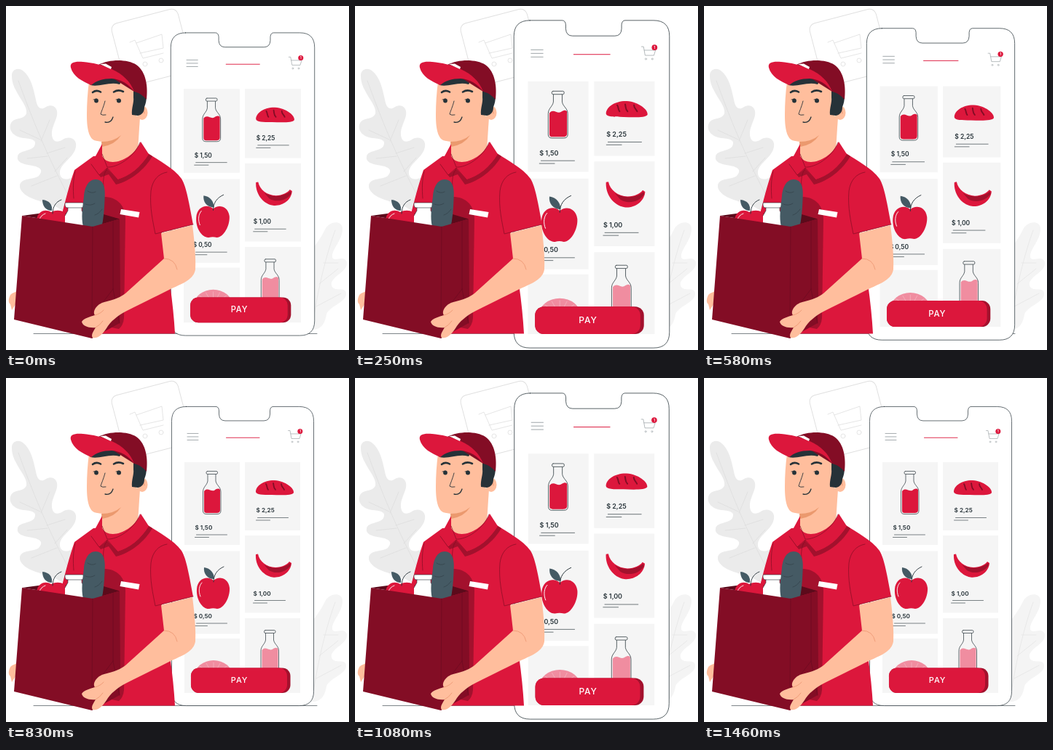
Animation, 471 px wide and 474 px high, one loop 1.5 s. Source, as an HTML page with a canvas:

```html
<!DOCTYPE html>
<html lang="en">
<head>
<meta charset="utf-8">
<title>Grocery delivery</title>
<style>
  html, body { margin: 0; width: 100%; height: 100%; overflow: hidden; background: #fff; }
  canvas { display: block; width: 471px; height: 474px; }
</style>
</head>
<body>
<canvas id="stage"></canvas>
<script>
const W = 471, H = 474, LOOP = 1500;
const RED = '#dc173c', SHADE = '#a3112d', WINE = '#830d25', PINK = '#f08da0';
const INK = '#263238', SLATE = '#455a64', FAINT = '#8f979b', SKIN = '#ffbe9d', PALE = '#ebebeb', TILE = '#f5f5f5';

const canvas = document.getElementById('stage');
const ctx = canvas.getContext('2d');
const ratio = window.devicePixelRatio || 1;
canvas.width = W * ratio;
canvas.height = H * ratio;

function fill(d, color) {
  ctx.fillStyle = color;
  ctx.fill(new Path2D(d));
}

function line(d, color = INK, width = 0.7) {
  ctx.strokeStyle = color;
  ctx.lineWidth = width;
  ctx.stroke(new Path2D(d));
}

function dot(x, y, rx, color, ry = rx) {
  ctx.fillStyle = color;
  ctx.beginPath();
  ctx.ellipse(x, y, rx, ry, 0, 0, Math.PI * 2);
  ctx.fill();
}

function box(x, y, w, h, color, r = 0) {
  ctx.fillStyle = color;
  ctx.beginPath();
  ctx.roundRect(x, y, w, h, r);
  ctx.fill();
}

function text(str, x, y, font, color, align = 'left', spacing = 0) {
  ctx.font = font + ' Inter, "Open Sans", sans-serif';
  ctx.letterSpacing = spacing + 'px';
  ctx.fillStyle = color;
  ctx.textAlign = align;
  ctx.fillText(str, x, y);
}

function at(x, y, draw) {
  ctx.save();
  ctx.translate(x, y);
  draw();
  ctx.restore();
}

function background() {
  fill('M8 97C7 88 16 84 23 89C35 98 38 116 41 129C43 141 48 144 55 139C64 134 72 140 70 151C68 160 62 168 63 178C64 187 70 189 78 184C88 178 98 184 96 194C94 208 76 216 74 228C73 237 80 241 89 237C102 231 115 231 121 241L124 280L80 284C68 274 55 272 44 268C30 264 18 256 19 247C21 236 38 240 45 234C52 226 47 222 36 220C25 218 14 216 16 207C18 198 34 201 39 193C43 185 36 183 25 182C11 181 2 171 7 161C12 153 25 157 28 148C30 139 19 128 14 117C10 110 8 104 8 97Z', PALE);
  line('M17 103C34 150 58 212 91 271M48 186L60 157M56 203L81 195M67 228L84 209M47 184L19 171M57 207L29 210M70 234L35 248', '#dedede', 0.8);

  fill('M410 350C421 333 430 325 438 308C444 296 461 295 462 306C463 322 447 335 448 346C450 354 464 342 468 353C470 367 445 372 447 385C450 395 465 386 467 395C469 408 444 413 440 425C438 437 433 445 423 446L405 445Z', '#f4f4f4');
  line('M452 309C440 342 428 390 421 440M436 354L456 354M430 383L456 362M426 414L460 396', '#e3e3e3', 0.7);

  ctx.save();
  ctx.translate(143, 26);
  ctx.rotate(-0.255);
  ctx.strokeStyle = '#e0e0e0';
  ctx.lineWidth = 1;
  ctx.beginPath();
  ctx.roundRect(0, 0, 94, 89, 9);
  ctx.stroke();
  ctx.restore();
  line('M170 50L177 47L188 72L216 65M179 51L214 39L216 58L184 65', '#e3e3e3', 0.9);
  line('M194 80a3 3 0 1 1-6 0a3 3 0 1 1 6 0M216 75a3 3 0 1 1-6 0a3 3 0 1 1 6 0', '#e3e3e3', 0.9);
  line('M38 451.5H427', INK, 0.6);
}

function bottle(color) {
  fill('M2 28C7 22 11 29 16 27C20 24 22 24 24 26V54C24 57 22 58 19 58H6C3 58 2 57 2 54Z', color);
  line('M6.500 0.500H19Q20.500 0.500 20.500 2.500T19 4.500H6.500Q5 4.500 5 2.500T6.500 .5M7 5V14C6 20 .5 22 .5 29V55Q.5 59.500 5 59.500H20Q25 59.500 25 55V29C25 22 19 20 18 14V5');
}

function bread() {
  fill('M343 157C343 148 355 140.500 369 141C384 142 396 152 395 158C393 162 378 161.500 365 161C352 161 344 161 343 157Z', RED);
  line('M357 146C359 149 358 152 360 154M367 145C368 149 367 151 370 154M378 146C378 150 381 151 382 154', WINE, 1.8);
}

function banana() {
  fill('M343 243L346 242.500C348 253 358 260.500 370 261C379 261 386 257 389 253L392 255C391 268 378 276 366 274.500C352 272 342 258 343 243Z', RED);
  fill('M354 257C365 264 380 263 390 255L391 258C385 268 370 271 361 265Z', SHADE);
}

function apple() {
  fill('M285 279C278 272 263 275 262 291C261 307 271 319 279 318C283 317 286 317 290 318C299 318 308 302 307 289C305 274 291 273 285 279Z', RED);
  fill('M286 277C276 277 271 269 272 261C281 262 286 269 286 277Z', SLATE);
  line('M285 281C285 271 290 264 299 260', INK, 0.9);
  line('M267 301C264 294 265 286 269 282', '#fff', 0.9);
}

function price(str, x, y, dx = 2) {
  text(str, x, y, '600 8.2px', INK);
  line(`M${x + dx} ${y + 7}h42`, INK, 0.6);
  line(`M${x} ${y + 10.5}h19`, INK, 0.6);
}

function screen() {
  const body = 'M247.500 39.500H288Q292 39.500 292.500 45V50Q293 59 301 59H354Q362 59 362.500 50V45Q363 39.500 367 39.500H402.500Q422.500 39.500 422.500 59.500V431.500Q422.500 451.500 402.500 451.500H247.500Q227.500 451.500 227.500 431.500V59.500Q227.500 39.500 247.500 39.500Z';
  fill(body, '#fff');
  line(body, INK, 0.7);

  line('M249 76.500H264M249 81H264M249 85.500H264', FAINT, 0.8);
  line('M302.500 82.300H348', RED, 0.9);
  line('M387.500 72.500H390L392 83.500H403L405 77M391 77H404', FAINT, 0.6);
  line('M394 88a1 1 0 1 1-2 0a1 1 0 1 1 2 0M402 88a1 1 0 1 1-2 0a1 1 0 1 1 2 0', FAINT, 0.5);
  dot(403.800, 73.600, 3.500, RED);
  text('1', 403.800, 75.200, '600 4.5px', '#fff', 'center');

  for (const [x, y, h] of [[245, 116, 114], [245, 238.500, 114], [245, 359, 75],
                           [328, 116, 94], [328, 217, 106.500], [328, 331, 103]]) {
    box(x, y, 76, h, TILE);
  }
  at(270, 128, () => bottle(RED));
  at(349.500, 347, () => bottle(PINK));
  bread();
  banana();
  apple();
  dot(285, 410, 26, PINK, 21);
  line('M285 410V392M285 410L275 393M285 410L294 393M285 410L266 397M285 410L303 397', '#f5b3c0', 0.7);

  price('$ 1,50', 259.500, 209);
  price('$ 2,25', 343.500, 185.500);
  price('$ 1,00', 339.500, 299.500);
  price('$ 0,50', 257.500, 331, 4);

  box(254, 399.500, 136.500, 34.500, SHADE, 11);
  box(254, 399.500, 132, 34.500, RED, 11);
  text('PAY', 320.500, 420.300, '500 11px', '#fff', 'center', 0.8);
}

function shirt() {
  fill('M120 207L94 226C87 246 81 270 76 290L130 451.500H232C230 410 222 360 214 312L257 301C252 275 248 249 241 238C230 223 210 213 195 203Z', RED);
  fill('M132 263C150 262 163 272 164 292L162 430Q161 440 155 445L130 440Z', SHADE);
  line('M221 229C209 231 201 240 199 255C197 278 202 298 205 314L257 301M95 228C92 240 92 252 93 265', WINE, 0.7);
  fill('M158 280L183.500 284L182 291.500L156.500 287Z', '#fff');
}

function head() {
  fill('M131 174L132 207C140 224 165 217 181 199L184 153L160 145Z', SKIN);
  dot(187, 147, 7.500, SKIN, 10);
  line('M184 144Q190 140 190 148', '#e8906a', 0.8);
  fill('M114 104C112 120 111 134 111 150C111 166 113 181 121 185C134 189 149 186 158 178C169 170 179 158 180 145L176 108L150 96Z', SKIN);
  fill('M131 187Q148 187 158 178Q150 191 132 194Z', '#eb996e');
  fill('M114 106L135 96L160 101L156 108C142 104 128 112 116 109Z', INK);
  fill('M175 111L191 115C194 123 193 133 190 139C190 146 187 150 181 151L173 150C172 141 176 133 175 126Z', INK);

  line('M119 119Q124 115 130 118.500M148 118.500Q154 114.500 161 118', INK, 2.6);
  dot(124, 130.500, 2.900, INK);
  dot(155, 130.500, 3, INK);
  line('M120 129L124 128M151 129L155 128', INK, 0.8);
  line('M136 131C134 139 131 145 130 149Q132 151 137 150', INK, 0.9);
  line('M136 160Q144 162 147 153', INK, 1.3);

  fill('M127 81C142 73 167 73 179 81C193 91 195 112 193 129C187 122 181 119 176 118L146 99Z', WINE);
  fill('M89 85C87 77 96 76 106 77C130 79 166 89 176 118C168 107 158 101 145 100C133 100 124 103 117 109C105 104 92 97 89 85Z', RED);
  fill('M129 80L137 79.500L145 84L144 87Z', '#fff');
}

function collar() {
  fill('M117 218L130 236L141 232L151 246C171 241 190 226 201 207L196 204C185 222 170 234 153 239L139 224L128 233Z', SHADE);
  fill('M185 187L196 204C185 222 170 234 153 239L139 224L128 233L117 218L132 190L132 207C140 223 173 214 185 187Z', RED);
  line('M184 188C176 209 152 223 139 222L132 204M117 218L128 233L139 223L153 239M139 224Q132 233 134 250', WINE, 0.7);
}

function groceries() {
  fill('M22 289L52 285L134 287L156 293.500L119 304Z', '#5c0a1b');
  fill('M62 284C53 278 41 284 42 298L55 318H84L85 292C82 281 70 280 62 284Z', RED);
  fill('M63 282C54 282 50 275 50 267C60 268 64 274 63 282Z', SLATE);
  line('M64 286C64 277 68 270 76 267', INK, 0.9);
  line('M46 294Q48 288 54 286', '#fff', 0.9);
  fill('M83 271H105Q107 271 107 274T104 278V282L110 291V310H81V289L85 282V278Q81 278 81 274T83 271Z', '#fff');
  line('M83 271H105Q107 271 107 274T104 278H84Q81 278 81 274T83 271M85 278V282L81 289M104 278V282L108 288', INK, 0.6);
  fill('M123 239C134 239 137 250 135.500 267C135 280 134 294 131 306L106 304C103 291 105 279 107 262C108 250 113 239 123 239Z', SLATE);
  line('M112 255Q118 259 123 256M109 273Q116 276 122 272M122 288Q128 286 132 280', '#37474f', 0.9);
}

function bag() {
  fill('M15 392C13 395 10 394 6 398C3 404 3 409 6 411L8 419L15 408Z', SKIN);
  groceries();
  fill('M22 289L119 304L156 293.500L157 400L156 437L118 458L11 432Z', WINE);
  line('M119 304L118 435M147 297L147 390M147 390L156 437M147 390L118 428', '#6b0b20', 0.7);
}

function arm() {
  fill('M213 313L256 302C259 325 261 350 260 363C258 376 244 382 228 389C204 401 180 413 164 421C153 427 143 435 138 444C133 452 126 459 119 457C116 453 121 447 123 443C114 444 105 441 104 435C107 430 116 428 122 426C118 420 126 410 135 408C148 405 158 401 164 396L217 348Z', SKIN);
  line('M217 348Q232 348 235 363M122 426Q130 424 134 419M123 443Q129 440 133 434', '#e8906a', 0.7);
}

// Pulse amount, 0 at rest and 1 at full size.
function pulse(time) {
  const t = (time + 37) % LOOP;
  const soften = u => (u + (1 - Math.cos(Math.PI * u)) / 2) / 2;
  if (t < 302) return t / 302;
  if (t < 867) return 1 - soften((t - 302) / 565);
  if (t < 1145) return (t - 867) / 278;
  return 1 - soften((t - 1145) / 355);
}

function render(time) {
  const scale = 1 + 0.1 * pulse(time);
  ctx.setTransform(ratio, 0, 0, ratio, 0, 0);
  ctx.lineCap = ctx.lineJoin = 'round';
  ctx.fillStyle = '#fff';
  ctx.fillRect(0, 0, W, H);
  background();

  ctx.save();
  ctx.translate(325, 245.500);
  ctx.scale(scale, scale);
  ctx.translate(-325, -245.500);
  screen();
  ctx.restore();

  shirt();
  head();
  collar();
  bag();
  arm();
}

const start = performance.now();
function tick() {
  render((performance.now() - start) % LOOP);
  requestAnimationFrame(tick);
}
tick();
</script>
</body>
</html>
```
